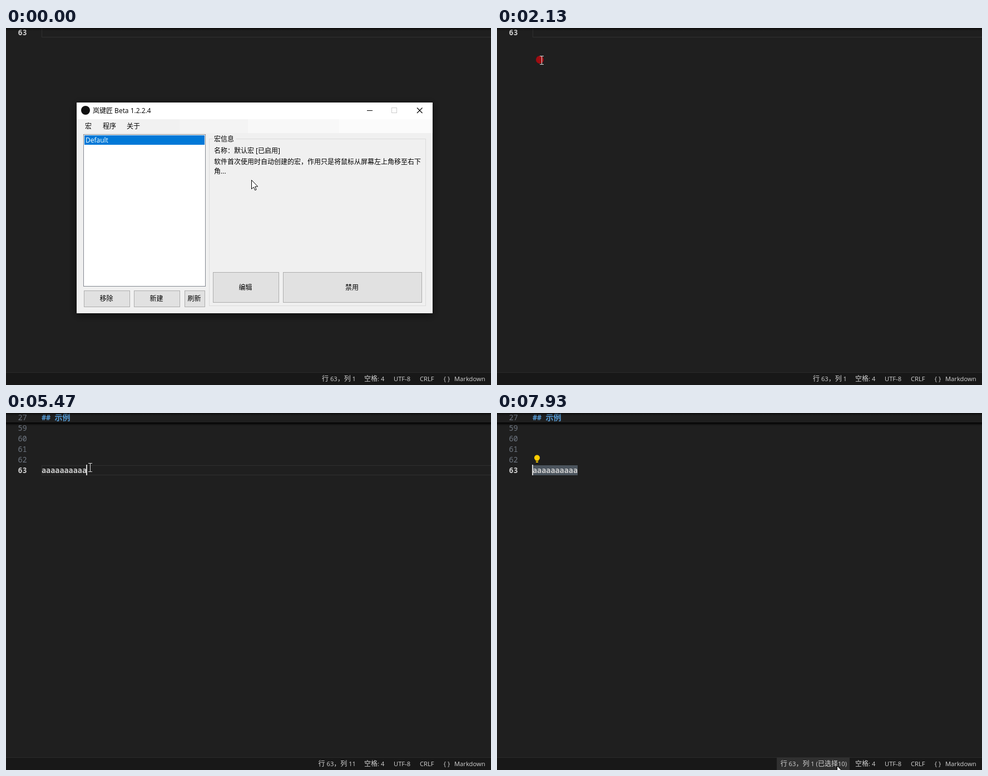
These frames come from a looping animation (872x642 px, 8 s). An HTML page with a canvas:

```html
<!DOCTYPE html>
<html lang="zh-CN">
<head>
<meta charset="utf-8">
<title>Macro demo</title>
<style>
html, body { margin: 0; width: 100%; height: 100%; overflow: hidden; background: #1f1f1f; }
canvas { display: block; }
</style>
</head>
<body>
<canvas id="stage" width="872" height="642"></canvas>
<script>
const ctx = document.getElementById('stage').getContext('2d');
const LOOP = 8000, FRAME = 200 / 3;
const CHAR = 8.1, LEFT = 64, LENGTH = 10, CARET_LAG = 80;
const CJK = '"Noto Sans CJK SC", "Noto Sans CJK", sans-serif';
const LATIN = '"Open Sans", "Noto Sans", sans-serif';
const MONO = '"Noto Sans Mono", "DejaVu Sans Mono", monospace';
const COMMA = '\uff0c', COLON = '\uff1a';

const JUMP = 1990, CLICK = 2070, HIDE = 2130, TYPE = 2250, STICKY = 4260;
const DRAG = 6000, BULB = 6590, HOVER = 7920;

// Pointer moves: start time, end time, destination
const moves = [
  [70, 700, 224, 213], [700, 1270, 502, 268], [JUMP, JUMP + 5, 80, 58], [4800, 5670, 162, 104],
  [DRAG, 6530, 52, 106], [6800, 6860, 57, 116], [7000, 7870, 588, 617], [HOVER - 5, HOVER, 611, 634]
];

const clamp = (v, a, b) => Math.min(b, Math.max(a, v));
const ease = k => k * k * (3 - 2 * k);

function pointer(t) {
  let x = 441, y = 273;
  for (const [start, end, toX, toY] of moves) {
    const k = ease(clamp((t - start) / (end - start), 0, 1));
    x += (toX - x) * k;
    y += (toY - y) * k;
  }
  return [x, y];
}

// Key presses come every 200 ms, a little faster after the fifth
const keyTime = i => TYPE + 200 * i - 28 * Math.max(0, i - 4);

function typed(t) {
  let n = 0;
  while (n < LENGTH && keyTime(n) <= t) n++;
  return n;
}

const selected = t => t < DRAG ? 0
  : clamp(Math.floor((142 - pointer(Math.min(t, 6600))[0]) / CHAR), 0, LENGTH);

// The caret glides: average its column over the last few milliseconds
function caretColumn(t) {
  const n = 20;
  let sum = 0;
  for (let i = 0; i < n; i++) {
    const s = t - (i + .5) * CARET_LAG / n;
    sum += typed(s) - selected(s);
  }
  return sum / n;
}

function caretAlpha(t) {
  const start = t < DRAG ? 4400 : 7000;
  if (t < start) return 1;
  const u = (t - start) % 1000;
  return clamp((Math.abs(u - 500) - 200) / 200, 0, 1);
}

function box(x, y, w, h, fill, stroke) {
  if (fill) { ctx.fillStyle = fill; ctx.fillRect(x, y, w, h); }
  if (stroke) {
    ctx.strokeStyle = stroke;
    ctx.lineWidth = 1;
    ctx.strokeRect(x + .5, y + .5, w - 1, h - 1);
  }
}

function disc(x, y, r, fill) {
  ctx.fillStyle = fill;
  ctx.beginPath();
  ctx.arc(x, y, r, 0, 7);
  ctx.fill();
}

function lines(color, width, ...segments) {
  ctx.strokeStyle = color;
  ctx.lineWidth = width;
  ctx.beginPath();
  for (const [a, b, c, d] of segments) { ctx.moveTo(a, b); ctx.lineTo(c, d); }
  ctx.stroke();
}

// UI text mixing Latin and Chinese runs; align 0 = left, .5 = centre, 1 = right
function label(text, x, y, color = '#000', size = 12, align = 0) {
  const runs = text.match(/[\x00-\x7f]+|[^\x00-\x7f]+/g).map(s => {
    const font = s.charCodeAt(0) < 128 ? size + 'px ' + LATIN : '12px ' + CJK;
    ctx.font = font;
    return { s, font, w: ctx.measureText(s).width };
  });
  x -= align * runs.reduce((sum, r) => sum + r.w, 0);
  ctx.fillStyle = color;
  for (const r of runs) {
    ctx.font = r.font;
    ctx.fillText(r.s, x, y);
    x += r.w;
  }
}

function code(text, x, y, color, weight = 400) {
  ctx.font = weight + ' 13.5px ' + MONO;
  ctx.fillStyle = color;
  ctx.fillText(text, x, y);
}

function shade(y, h, alpha) {
  const g = ctx.createLinearGradient(0, y, 0, y + h);
  g.addColorStop(0, `rgba(0,0,0,${alpha})`);
  g.addColorStop(1, 'rgba(0,0,0,0)');
  box(0, y, 872, h, g);
}

function editor(t) {
  box(0, 0, 872, 642, '#1f1f1f');
  const count = typed(t), sel = selected(t), top = count ? 94 : -1;
  if (!sel) box(LEFT, top, 820, 18, null, '#303030');

  if (count)
    for (let i = 0; i < 5; i++) code(58 + i, 21.5, 13 + 19 * i, '#6e7681');
  code('63', 21.5, top + 14, '#cccccc', 600);

  if (sel) {
    box(LEFT, 94, LENGTH * CHAR, 18, '#393e42');
    box(LEFT + (LENGTH - sel) * CHAR, 94, sel * CHAR, 18, '#4b545d');
  }
  code('a'.repeat(count), LEFT, 108, '#cccccc', 600);

  if (t >= HIDE + 60) {
    ctx.globalAlpha = caretAlpha(t);
    box(Math.round(LEFT + caretColumn(t) * CHAR) - (count ? 1 : 0), top - 1, 2, 19, '#d0d0d0');
    ctx.globalAlpha = 1;
  }

  if (t >= STICKY) {
    box(0, 0, 872, 18, '#1f1f1f');
    code('27', 21.5, 13, '#6e7681');
    code('##', LEFT, 13, '#569cd6', 700);
    ctx.font = '700 14px ' + CJK;
    ctx.fillText('示例', 87.5, 13);
    shade(17, 6, .95);
  }
  shade(0, 5, .6);
  if (t >= BULB) bulb();
}

function bulb() {
  disc(72, 80.5, 5, '#ffcc00');
  box(69.5, 83, 5, 3, '#ffcc00');
  box(70, 87, 4, 2, '#ffcc00');
}

function statusBar(t) {
  box(0, 619, 872, 23, '#181818');
  box(0, 619, 872, 1, '#2b2b2b');
  if (t >= HOVER) box(503, 620, 131, 22, '#303030');
  const sel = selected(t), col = typed(t) - sel + 1;
  const put = (s, x, align) => label(s, x, 635, '#d2d2d2', 11.2, align);
  put(`行 63${COMMA}列 ${col}` + (sel ? ` (已选择${sel})` : ''), 629, 1);
  put('空格: 4', 644);
  put('UTF-8', 697);
  put('CRLF', 744);
  put('{ }', 792.5, .5);
  put('Markdown', 806);
}

function button(text, x, y, w, h) {
  box(x, y, w, h, '#e1e1e1', '#adadad');
  label(text, x + w / 2 - 1, y + h / 2 + 4, '#000', 12, .5);
}

function dialog() {
  ctx.save();
  ctx.shadowColor = 'rgba(0,0,0,.55)';
  ctx.shadowBlur = 14;
  ctx.shadowOffsetY = 3;
  box(127, 134, 640, 379, '#f0f0f0');
  ctx.restore();

  box(127, 134, 640, 30, '#ffffff');
  disc(143, 148, 8, '#111');
  label('岚键匠 Beta 1.2.2.4', 156, 153);
  lines('#000', 1, [649, 148.5, 659, 148.5]);
  box(693, 143, 10, 10, null, '#cccccc');
  lines('#000', 1.1, [739, 143.5, 748.5, 153], [748.5, 143.5, 739, 153]);

  // The menu strip brightens to the right in steps
  [127, 312, 435, 599].forEach((x, i) =>
    box(x, 164, 767 - x, 25, `hsl(0 0% ${94.5 + 1.3 * i}%)`));
  label('宏', 142, 181);
  label('程序', 174, 181);
  label('关于', 217, 181);

  box(139, 191, 220, 274, '#ffffff', '#828790');
  box(141, 193, 216, 17, '#0078d7');
  label('Default', 143, 206, '#fff');
  button('移除', 140, 472, 83, 30);
  button('新建', 230, 472, 83, 30);
  button('刷新', 321, 472, 37, 30);

  box(365, 199, 390, 301, null, '#dcdcdc');
  box(372, 195, 41, 10, '#f0f0f0');
  label('宏信息', 374, 204);
  label(`名称${COLON}默认宏 [已启用]`, 374, 225);
  label(`软件首次使用时自动创建的宏${COMMA}作用只是将鼠标从屏幕左上角移至右下`, 374, 245);
  label('角...', 374, 262);
  button('编辑', 372, 439, 119, 55);
  button('禁用', 498, 439, 250, 55);
}

// A click mark grows from a dot into a fading ring
function ripple(t, start, x, y) {
  const k = (t - start) / 262;
  if (k <= 0 || k >= 1) return;
  const r = 29 * k, w = r < 8 ? r : 5;
  ctx.globalAlpha = 1 - k;
  ctx.lineWidth = w;
  ctx.strokeStyle = '#c8070d';
  ctx.beginPath();
  ctx.arc(x, y, r - w / 2, 0, 7);
  ctx.stroke();
  ctx.globalAlpha = 1;
}

function arrow(x, y) {
  const outline = [[0, 0], [0, 16], [3.7, 12.6], [6.2, 18.2], [8.6, 17.2], [6.2, 11.8], [11.2, 11.5]];
  ctx.beginPath();
  outline.forEach(([dx, dy]) => ctx.lineTo(x + .5 + dx, y + .5 + dy));
  ctx.closePath();
  ctx.fillStyle = '#fff';
  ctx.fill();
  ctx.strokeStyle = '#000';
  ctx.lineWidth = 1;
  ctx.stroke();
}

function ibeam(x, y) {
  x = Math.round(x);
  y = Math.round(y);
  const serif = dy => [x - 3, y + dy, x + 4, y + dy];
  lines('#d8d8d8', 1, [x + .5, y - 7, x + .5, y + 7], serif(-7.5), serif(7.5));
}

function draw(t) {
  editor(t);
  statusBar(t);
  if (t < HIDE) dialog();
  ripple(t, CLICK, 77, 57);
  ripple(t, DRAG, 162, 105);
  const [x, y] = pointer(t);
  (t < JUMP || t >= HOVER ? arrow : ibeam)(x, y);
}

function tick() {
  const t = performance.now() % LOOP;
  draw(Math.floor((t + 5) / FRAME) * FRAME % LOOP);
  requestAnimationFrame(tick);
}
tick();
</script>
</body>
</html>
```
